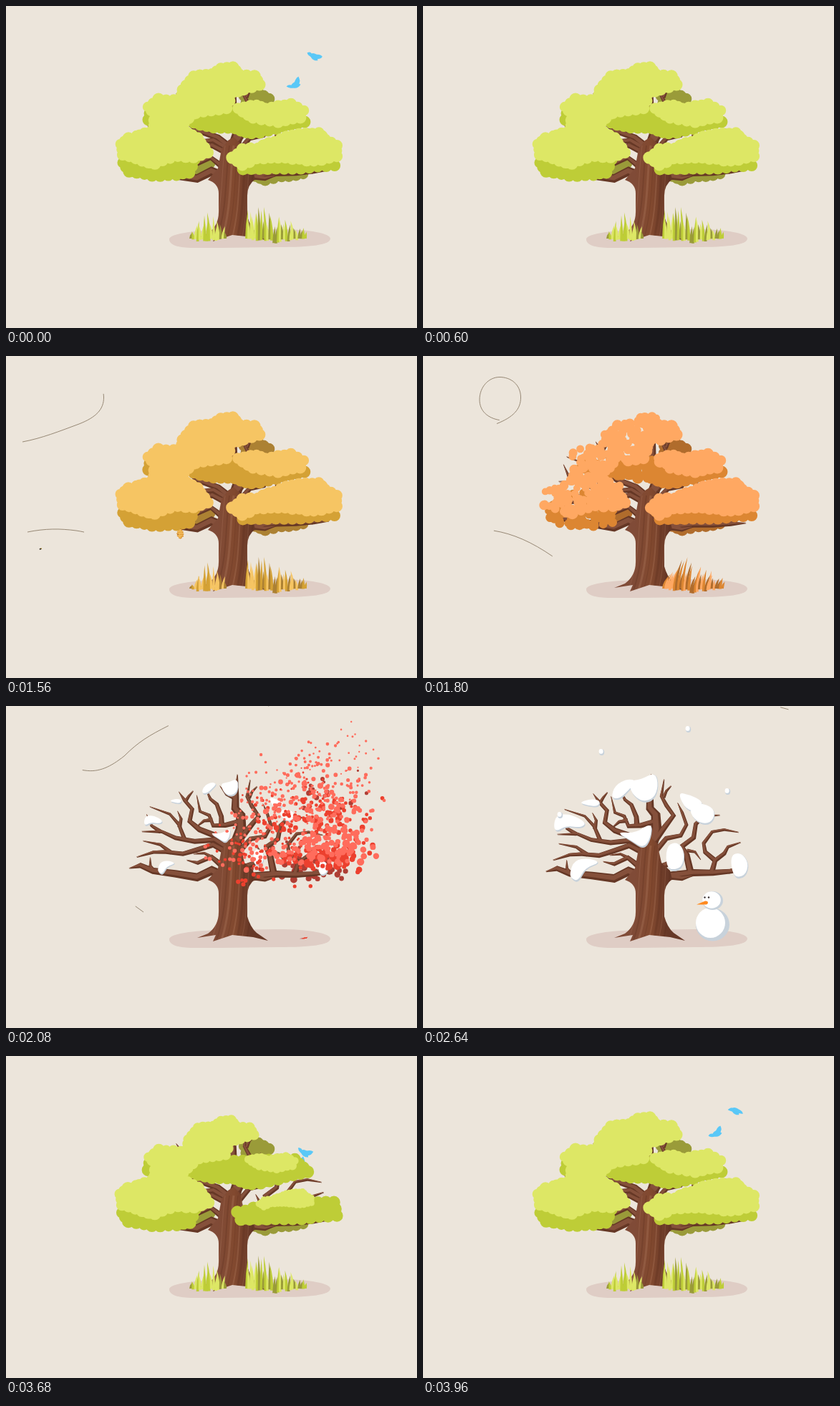
Animation of 574x450 px, one loop 4 s. Source, as an HTML page with a canvas:

```html
<!DOCTYPE html>
<html lang="en">
<head>
<meta charset="utf-8">
<title>Tree through the seasons</title>
<style>
html, body { margin: 0; width: 100%; height: 100%; overflow: hidden; background: #ece5db; }
canvas, svg { position: absolute; left: 0; top: 0; display: block; }
path { fill: none; stroke: #8d7d69; stroke-width: .9; }
</style>
</head>
<body>
<canvas id="stage" width="574" height="450"></canvas>
<svg width="574" height="450">
  <path pathLength="100" d="M23 120C50 115 75 105 102 95C125 86 137 75 136.500 57C136 40 123 29.500 107 29.500C92 29.500 79 43 79 61C79 78 92 88 110 90C130 93 146 85 165 70C185 50 200 41 228 27L300 -10"/>
  <path pathLength="100" d="M30 246C55 241 75 241 98 244C125 248 152 260 181 280L192 288"/>
  <path pathLength="100" d="M366 0Q432 -14 500 2C525 9 550 15 580 12"/>
</svg>
<script>
const LOOP = 4000;
const ctx = document.getElementById('stage').getContext('2d');
const windLines = document.querySelectorAll('path');

let seed = 7;
const random = () => (seed = seed * 16807 % 2147483647) / 2147483647;
const clamp = v => Math.max(0, Math.min(1, v));
const overshoot = p => 1 + 2.2 * (p - 1) ** 3 + 1.2 * (p - 1) ** 2;
const points = text => {
  const n = text.split(' ').map(Number);
  return n.filter((_, i) => i % 2 === 0).map((x, i) => [x, n[2 * i + 1]]);
};
const center = pts => [0, 1].map(k => pts.reduce((sum, p) => sum + p[k], 0) / pts.length);

// Piecewise linear value from time, value pairs.
function key(t, ...k) {
  if (t <= k[0]) return k[1];
  for (let i = 2; i < k.length; i += 2) {
    if (t < k[i]) return k[i - 1] + (k[i + 1] - k[i - 1]) * (t - k[i - 2]) / (k[i] - k[i - 2]);
  }
  return k[k.length - 1];
}

function fill(color, path) { ctx.fillStyle = color; ctx.fill(path); }
function ellipse(color, x, y, rx, ry = rx, angle = 0) {
  ctx.beginPath();
  ctx.ellipse(x, y, rx, ry, angle, 0, 7);
  ctx.fillStyle = color;
  ctx.fill();
}
function placed(x, y, angle, sx, sy, draw) {
  ctx.save();
  ctx.translate(x, y);
  ctx.rotate(angle);
  ctx.scale(sx, sy);
  draw();
  ctx.restore();
}

// Season colours: back, middle and front foliage for spring, summer, autumn, late autumn.
const seasons = [
  [[154, 155, 57], [190, 205, 55], [221, 231, 101]],
  [[168, 147, 56], [205, 184, 55], [239, 221, 99]],
  [[176, 108, 44], [220, 134, 50], [255, 168, 98]],
  [[174, 62, 52], [236, 64, 46], [255, 108, 92]]
];
function seasonColor(t, tier) {
  const s = t > 3000 ? 0 : key(t, 700, 0, 1100, 1, 1400, 1, 1750, 2, 1820, 2, 2060, 3);
  const i = Math.min(2, Math.floor(s));
  const mix = seasons[i][tier].map((c, k) => c + (seasons[i + 1][tier][k] - c) * (s - i));
  return `rgb(${mix.map(Math.round)})`;
}

// Foliage: discs along each outline and on a jittered grid inside it.
const tiers = [[], [], []];
let clumpCount = 0;
function clump(tier, text) {
  const pts = points(text), path = new Path2D('M' + text + 'Z'), origin = center(pts);
  const delay = 3400 + 22 * clumpCount++;
  const add = (x, y, r) => tiers[tier].push({
    x, y, r, origin, delay, speed: .6 + .65 * random(), lift: random(),
    leave: 1565 + (x - 150) * .8 + (y - 80) * .45 + random() * 110
  });
  pts.forEach(([x, y], i) => {
    const [x2, y2] = pts[(i + 1) % pts.length];
    const steps = Math.ceil(Math.hypot(x2 - x, y2 - y) / 12);
    for (let s = 0; s < steps; s++) add(x + (x2 - x) * s / steps, y + (y2 - y) * s / steps, 7.2 + 1.6 * random());
  });
  for (let y = 80; y < 250; y += 7) {
    for (let x = 150; x < 475; x += 7) {
      const jx = x + 3 * random(), jy = y + 3 * random();
      if (ctx.isPointInPath(path, jx, jy)) add(jx, jy, 6.5 + random());
    }
  }
}
clump(0, '332 126 352 122 367 130 340 145');
clump(0, '348 238 362 243 385 239 415 235 400 225 350 225');
clump(0, '268 219 284 219 278 230 262 228');
clump(1, '163 219 172 231 204 237 238 237 256 233 264 215 200 190');
clump(1, '200 150 199 159 215 160 230 150');
clump(1, '262 150 262 164 290 170 320 172 343 179 378 172 417 162 400 145');
clump(1, '326 218 331 228 400 228 459 223 455 205 380 205');
clump(2, '160 193 171 185 205 174 245 172 268 184 282 205 262 211 240 210 208 220 190 217 163 208');
clump(2, '198 141 213 130 245 132 262 150 248 164 220 172 206 168 208 151');
clump(2, '246 117 262 98 288 95 300 87 317 86 325 95 347 98 354 110 332 117 316 122 308 143 265 150 245 132');
clump(2, '324 143 350 138 362 143 398 137 416 146 411 156 380 162 345 157');
clump(2, '316 212 330 200 352 198 375 189 400 180 437 177 446 186 462 195 462 210 430 217 390 212 350 214 330 222');

function drawFoliage(t, tier) {
  if (t > 2290 && t < 3400) return;
  const sway = tier ? key(t, 700, 0, 1200, -1.5, 1600, 0) : 0;
  ctx.beginPath();
  for (const d of tiers[tier]) {
    let x = d.x + sway, y = d.y, r = d.r;
    if (t > 3000) {
      const grow = overshoot(clamp((t - d.delay) / 260));
      x = d.origin[0] + (x - d.origin[0]) * grow;
      y = d.origin[1] + (y - d.origin[1]) * grow;
      r *= Math.max(0, grow);
    } else {
      const gone = Math.max(0, t - d.leave) / 1000;
      const drift = 1350 * d.speed * gone * gone;
      x += drift;
      y += drift * (.12 - .5 * d.lift);
      r *= Math.exp(-gone * (2.6 + 2 * d.lift)) * clamp((2290 - t) / 130);
    }
    if (r < .1) continue;
    ctx.moveTo(x + r, y);
    ctx.arc(x, y, r, 0, 7);
  }
  ctx.fillStyle = seasonColor(t, tier);
  ctx.fill();
}

// Tapered limb along a polyline.
function limb(pts, width) {
  const left = [], right = [], last = pts.length - 1;
  pts.forEach(([x, y], i) => {
    const a = pts[Math.max(0, i - 1)], b = pts[Math.min(last, i + 1)];
    const dx = b[0] - a[0], dy = b[1] - a[1], len = Math.hypot(dx, dy);
    const w = i === last ? .3 : width / 2 * (1 - .6 * i / last);
    left.push([x - dy / len * w, y + dx / len * w]);
    right.unshift([x + dy / len * w, y - dx / len * w]);
  });
  return new Path2D('M' + left.concat(right).join('L') + 'Z');
}
const limbs = [];
const branch = (width, text) => {
  const pts = points(text);
  limbs.push([limb(pts, width), limb(pts.map(([x, y]) => [x - .6, y - .9]), width * .55)]);
};
branch(15, '306 240 287 231 267 241 236 237 205 234 187 227 172 232');
branch(6, '206 234 201 227 201 216');
branch(9, '304 226 286 212 267 221 252 218');
branch(5, '286 212 276 207 261 209');
branch(9, '310 206 288 195 265 203 246 209 222 207 205 208 182 216');
branch(6, '230 208 214 197 190 193');
branch(9, '314 202 290 188 262 191 235 187 216 179 188 180');
branch(6, '214 179 201 171 194 156');
branch(6, '248 189 239 168 226 154 198 145');
branch(6, '240 172 242 160 237 150');
branch(10, '316 200 296 184 268 174 254 163 257 146 246 134 238 123');
branch(5, '247 136 252 128 258 121');
branch(8, '322 162 304 167 287 168 281 154 268 149 263 127');
branch(6, '286 160 274 162 264 171');
branch(8, '299 169 298 155 291 138 282 131 274 115');
branch(19, '319 224 318 198 326 172 325 152 317 143 317 126 319 96');
branch(5, '317 130 304 124 295 113');
branch(9, '324 188 337 170 350 153 340 139 333 126 337 103');
branch(5, '336 128 340 119 347 112');
branch(8, '324 204 340 185 360 181 368 166 362 149 356 136');
branch(9, '330 226 348 218 355 205 349 194');
branch(10, '374 234 368 208 362 196 378 184 381 165 392 154 415 153');
branch(5, '369 202 380 204 388 215');
branch(13, '322 242 348 237 378 233 405 233 430 231 451 230');
branch(8, '403 234 408 216 421 206 426 197 444 191');
branch(7, '408 216 394 204 392 192 404 176 421 173 441 177');
branch(6, '426 232 437 227 442 216');
branch(9, '345 238 362 241 376 238');

const trunk = new Path2D('M267 324L282 318Q297 307 297 288L297 262Q297 248 282 243L296 227L301 200L310 188L318 183L327 192L333 219L345 230L348 242Q337 250 337 265L337 294Q341 309 350 317L366 328L345 323L316 320L289 329L293 320Z');
const shadow = new Path2D('M228 326C228 318 262 314 300 313L380 312C425 312 453 318 453 325C453 334 425 337 380 337L300 338L262 338C240 338 228 334 228 326Z');
const bark = ctx.createLinearGradient(295, 0, 342, 0);
bark.addColorStop(0, '#804b37');
bark.addColorStop(.5, '#82492f');
bark.addColorStop(1, '#673827');

function drawTree(t) {
  placed(318, 240, key(t, 1500, 0, 1720, .03, 2080, .032, 2400, 0), 1, 1, () => {
    ctx.translate(-318, -240);
    limbs.forEach(([edge]) => fill('#653725', edge));
    limbs.forEach(([, face]) => fill('#85503b', face));
  });
  ctx.save();
  fill(bark, trunk);
  ctx.clip(trunk);
  for (let i = 0; i < 8; i++) {
    const x = 296 + 6 * i;
    ctx.beginPath();
    ctx.moveTo(x + 10, 195);
    ctx.bezierCurveTo(x + 4, 235, x + 8, 280, x - 9 + i, 327);
    ctx.lineWidth = 1 + i % 3;
    ctx.strokeStyle = i % 2 ? 'rgba(80,38,24,.22)' : 'rgba(220,165,135,.17)';
    ctx.stroke();
  }
  ctx.restore();
}

// Smooth closed shape through edge midpoints.
function blob(pts) {
  const path = new Path2D();
  pts.forEach((p, i) => {
    const q = pts[(i + 1) % pts.length], m = [(p[0] + q[0]) / 2, (p[1] + q[1]) / 2];
    if (i) path.quadraticCurveTo(...p, ...m); else path.moveTo(...m);
    if (i === pts.length - 1) path.quadraticCurveTo(...q, (q[0] + pts[1][0]) / 2, (q[1] + pts[1][1]) / 2);
  });
  return path;
}
const drifts = [
  '184 169 187 153 205 151 226 163 219 170 200 167 188 175',
  '206 234 212 216 230 213 246 219 226 226 217 244 209 241',
  '219 135 234 130 246 132 244 140 231 139',
  '264 128 269 111 285 102 297 105 286 118 275 129',
  '289 105 305 103 323 93 327 112 321 129 306 133 293 122',
  '272 176 297 178 318 163 316 185 307 198 292 188',
  '357 121 372 124 389 133 387 142 369 147',
  '373 142 386 135 405 143 405 158 394 165 379 158',
  '342 194 356 191 364 205 361 225 346 229 340 218',
  '430 209 444 205 454 220 449 237 434 239'
].map(text => {
  const pts = points(text), [x, y] = center(pts);
  return { x, y, path: blob(pts.map(p => [p[0] - x, p[1] - y])) };
});
function drawSnow(t) {
  const size = key(t, 1960, 0, 2080, .64, 2480, 1.1, 2900, 1.1, 3360, .64, 3470, 0);
  if (!size) return;
  placed(318, 240, key(t, 2080, .03, 2400, 0), 1, 1, () => {
    for (const { x, y, path } of drifts) {
      placed(x - 317, y - 238.5, 0, size, size, () => fill('#c8d2db', path));
      placed(x - 318, y - 240, 0, size, size * .94, () => fill('#fff', path));
    }
  });
}

// Each flake: x, height at 2640 ms, height where it settles.
const flakes = [[370, 32, 128], [249, 64, 133], [425, 119, 212], [191, 152, 160], [312, -50, 105], [282, 150, 112], [392, 190, 143]];
function drawFlakes(t) {
  if (t < 2240 || t > 3400) return;
  for (const [x, y, land] of flakes) {
    const at = y + .18 * (t - 2640);
    if (at > land) continue;
    ellipse('#c8d2db', x + .6, at + .7, 3.6, 4.2);
    ellipse('#fff', x - .4, at - .6, 3, 3.4);
  }
}

function drawSnowman(t) {
  if (t < 2200 || t > 3450) return;
  const grow = overshoot(clamp((t - 2200) / 240)), melt = key(t, 2880, 0, 3340, 1, 3450, 1.1);
  const squash = Math.max(.01, 1 - .885 * melt);
  placed(404 - 4 * melt, 328, 0, Math.max(0, grow * (1 - .14 * melt)), Math.max(0, grow * squash), () => {
    ellipse('#c8d2db', .5, -22.5, 23.5, 23);
    ellipse('#fff', -2.5, -25, 20.5, 21);
    ellipse('#c8d2db', .5, -56, 14.5, 13);
    ellipse('#fff', -1, -57, 12.8, 11.8);
    ellipse('#3a3030', -10.5, -60.5, 1.2);
    ellipse('#3a3030', -5, -60.5, 1.2);
    fill('#ff8a1f', new Path2D('M-22 -50.500L-10 -55.500Q-6 -56 -6 -53Q-6.500 -50 -10 -50.500Z'));
  });
}

const blades = [];
function tuft(from, to, count, height) {
  for (let i = 0; i < count; i++) {
    const u = i / (count - 1);
    blades.push({
      x: from + (to - from) * u, y: 323 + 7 * random() * Math.sin(Math.PI * u) + 2,
      h: height(u) * (.5 + .5 * random()), lean: 6 * random() - 3, tier: Math.floor(3 * random())
    });
  }
}
tuft(258, 306, 16, u => 11 + 33 * Math.sin(Math.PI * u));
tuft(336, 418, 29, u => 52 - 35 * u ** 2);

function drawGrass(t) {
  const wind = key(t, 600, 0, 1200, -6, 1550, 0, 1800, 9);
  const colors = [0, 1, 2].map(tier => seasonColor(t, tier));
  for (const b of blades) {
    const start = 1500 + (b.x - 257) * 3;
    const size = t > 3000 ? overshoot(clamp((t - 3440 - (b.x - 257)) / 260)) : 1 - clamp((t - start) / 125);
    if (size <= 0) continue;
    const h = b.h * size, tip = b.x + (t > 3000 ? b.lean : b.lean + wind * b.h / 45);
    ctx.beginPath();
    ctx.moveTo(b.x - 1.9, b.y);
    ctx.quadraticCurveTo(b.x - 1.8, b.y - h * .5, tip, b.y - h);
    ctx.quadraticCurveTo(b.x + 2.6, b.y - h * .5, b.x + 1.9, b.y);
    ctx.fillStyle = colors[b.tier];
    ctx.fill();
  }
}

function drawHive(t) {
  const size = key(t, 900, 0, 1020, 1.08, 1080, 1, 1480, 1, 1600, 0);
  if (!size) return;
  placed(243.5, 242, .03 * Math.sin(t / 120), size, size, () => {
    [[4, 9], [11, 13.5], [19, 15.5], [27, 14], [34, 7.5]].forEach(([y, w]) => {
      ellipse('#dc9636', 0, y + 1, w, 5.2, .06);
      ellipse('#f2ba58', -1.5, y - .6, w - 2, 3.5, .06);
    });
    ellipse('#a9652a', -10, 22, 2.5, 3);
  });
}
function drawBees(t) {
  for (const x of [key(t, 1140, 236, 1200, 211, 1600, 30), key(t, 1000, 236, 1200, 140, 1460, 30)]) {
    if (x >= 236 || x <= 30) continue;
    const y = 267.5 + 3.6 * Math.sin((x - 189) / 14);
    ellipse('#d9b84a', x + 1, y - .5, 1, .8);
    ellipse('#30281f', x, y, 1.5, .9, -.3);
  }
}

function bird(x, y, angle, flap) {
  placed(x, y, angle, 1, 1, () => {
    fill('#5ac8f7', new Path2D('M-7 1Q-4 -4 2 -2L9 1L5 3L6 6Q0 8 -4 4Z'));
    for (const side of [-1, 1]) {
      fill('#5ac8f7', new Path2D(`M-3 1Q${side * 6} ${-5 - flap} ${side * 11} ${-1 - flap * 4}Q${side * 9} 4 3 4Z`));
    }
  });
}
function drawBirds(t) {
  const f = t > 3000 ? t - LOOP : t;
  if (f < -360 || f > 480) return;
  const flap = Math.sin(f / 32);
  bird(key(f, -360, 410, -180, 445, -40, 437, 0, 431, 180, 395, 420, 325), key(f, -360, 145, -180, 96, -40, 75, 0, 69, 180, 66, 420, 105), .25, flap);
  bird(key(f, -360, 405, -180, 428, -40, 409, 0, 403, 320, 345), key(f, -360, 160, -180, 122, -40, 107, 0, 109, 320, 137), -.7, .9 + .4 * flap);
}

function drawWind(t) {
  const spans = [
    [key(t, 1676, 0, 1800, 17, 2080, 55.3, 2406, 100), key(t, 1300, 0, 1800, 55.3, 2080, 83.4, 2246, 100)],
    [key(t, 1585, 0, 1800, 40, 2080, 92, 2140, 100), key(t, 1320, 0, 1800, 92, 1860, 100)],
    [key(t, 2080, 0, 2640, 62, 2800, 100), key(t, 2040, 0, 2080, 6, 2640, 67.5, 2780, 100)]
  ];
  spans.forEach(([tail, head], i) => {
    windLines[i].style.visibility = head > tail ? 'visible' : 'hidden';
    windLines[i].style.strokeDasharray = `0 ${tail} ${Math.max(0, head - tail)} 200`;
  });
}

function frame(now) {
  const t = now % LOOP;
  ctx.fillStyle = '#ece5db';
  ctx.fillRect(0, 0, 574, 450);
  fill('#dfcdc5', shadow);
  drawBirds(t);
  drawFoliage(t, 0);
  drawTree(t);
  drawHive(t);
  drawSnow(t);
  drawFoliage(t, 1);
  drawFoliage(t, 2);
  drawBees(t);
  drawGrass(t);
  drawSnowman(t);
  drawFlakes(t);
  drawWind(t);
}
let begin;
function tick(now) {
  begin ??= now;
  frame(now - begin);
  requestAnimationFrame(tick);
}
frame(0);
requestAnimationFrame(tick);
</script>
</body>
</html>
```
